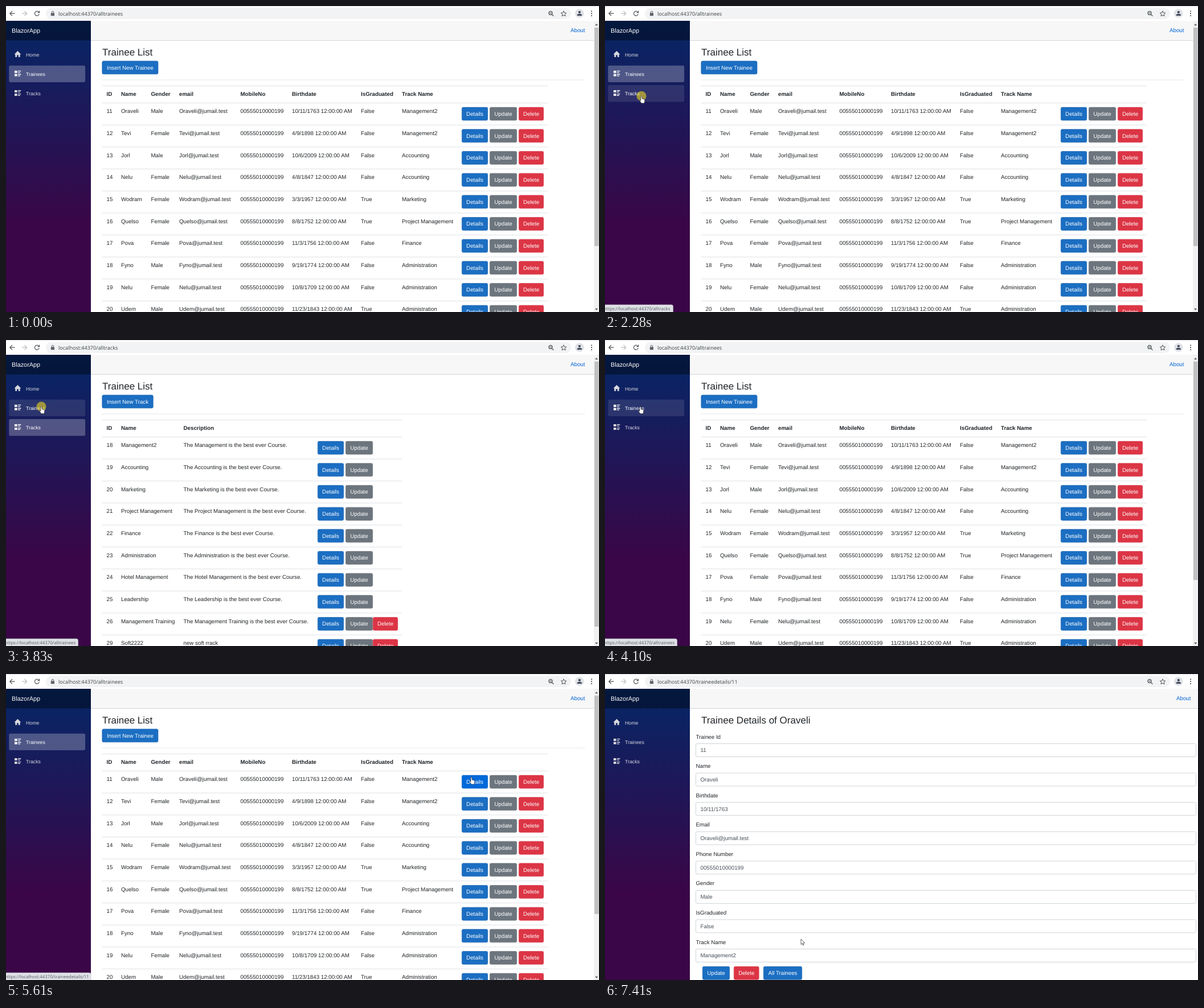
An HTML page that plays this animation: 1041x538 px, repeating every 8 s.

```html
<!DOCTYPE html>
<html lang="en">
<head>
<meta charset="utf-8">
<title>Trainee admin</title>
<style>
  html, body { margin: 0; width: 100%; height: 100%; overflow: hidden; background: #fff; }
  svg { display: block; width: 100%; height: 100%; }
  text { font: 9.75px "Liberation Sans", Arial, sans-serif; fill: #212529; text-rendering: geometricPrecision; white-space: pre; }
  .bold { font-weight: bold; }
  .title { font-size: 17.05px; }
  .ui { font-family: "Open Sans", sans-serif; font-size: 9.05px; fill: #3c4043; }
  .status { font-size: 7.8px; fill: #55585c; }
  .brand { font-size: 10.85px; fill: #fff; }
  .link { fill: #0366d6; }
  .value { fill: #495057; }
  .label { fill: #fff; text-anchor: middle; }
  .blue { fill: #1b6ec2; stroke: #1861ac; }
  .gray { fill: #6c757d; stroke: #6c757d; }
  .red { fill: #dc3545; stroke: #dc3545; }
  .blue.hover { fill: #0069d9; stroke: #0062cc; }
  .gray.hover { fill: #5a6268; stroke: #545b62; }
  .red.hover { fill: #c82333; stroke: #bd2130; }
  .nav text { font-size: 8.77px; }
  .nav text, .nav path { fill: #d9d9de; }
  .nav.active text, .nav.active path, .nav.hover text, .nav.hover path { fill: #fff; }
  .nav rect { fill: #fff; fill-opacity: 0; }
  .nav.active rect { fill-opacity: .25; }
  .nav.hover rect { fill-opacity: .1; }
</style>
</head>
<body>
<svg id="stage" viewBox="0 0 1041 538" preserveAspectRatio="none"></svg>
<script>
const DURATION = 8000;
const stage = document.getElementById('stage');

const text = (x, y, s, cls = '') => `<text x="${x}" y="${y}" class="${cls}">${s}</text>`;
const rect = (x, y, w, h, fill, rx = 0) =>
  `<rect x="${x}" y="${y}" width="${w}" height="${h}" rx="${rx}" fill="${fill}"/>`;
const path = (d, attrs = '') => `<path d="${d}" ${attrs}/>`;
const line = (x1, x2, y, color = '#dee2e6') => path(`M${x1} ${y}H${x2}`, `stroke="${color}"`);
const button = (x, right, y, label, color) =>
  `<rect class="hot ${color}" x="${x + .3}" y="${y + .3}" width="${right - x - .6}" height="23" rx="2.4" stroke-width=".6"/>`
  + text((x + right) / 2, y + 15.1, label, 'label');

// ---- browser frame and sidebar ----
function chrome() {
  const ink = 'fill="none" stroke="#4d5156" stroke-width="1.2"';
  return rect(0, 0, 1041, 26, '#fff') + rect(0, 0, 1041, 1, '#dfe1e5')
    + rect(70, 3.5, 922, 19.5, '#f1f3f4', 9.7)
    + path('M15.5 13.2H7M11 9L6.8 13.2L11 17.4', ink)
    + path('M28 13.2H36.5M32.5 9L36.7 13.2L32.5 17.4', 'fill="none" stroke="#b9bcc0" stroke-width="1.2"')
    + path('M57.6 10.6A4 4 0 1 0 58.3 14.2M58.6 8.6V11.7H55.4', ink)
    + rect(78.8, 12.3, 6.2, 5, '#5f6368', .6)
    + path('M80.2 12.5V11A1.7 1.7 0 0 1 83.6 11V12.5', 'fill="none" stroke="#5f6368"')
    + `<circle cx="956" cy="12.4" r="3" ${ink}/>` + path('M958.2 14.7L961.4 17.8M954.6 12.4H957.4', ink)
    + path('M979 8.8L980.4 11.9L983.8 12.2L981.2 14.5L982 17.8L979 16L976 17.8L976.8 14.5L974.2 12.2L977.6 11.9Z',
        'fill="none" stroke="#4d5156"')
    + '<circle cx="1006.8" cy="13" r="7.8" fill="#dfe1e6"/><circle cx="1006.8" cy="10.8" r="2.1" fill="#3d4657"/>'
    + path('M1002.6 17V16Q1003.2 13.8 1006.8 13.8T1011 16V17Z', 'fill="#3d4657"')
    + [9.3, 13.2, 17.1].map(y => `<circle cx="1028" cy="${y}" r="1.1" fill="#4d5156"/>`).join('')
    + '<text id="url" class="ui" x="92" y="16.7"></text>';
}

function navItem(name, i) {
  const y = 70.5 + i * 34.3;
  const home = 'M20.5 8.6L14.6 14.4H16.3V19.2H19.2V15.8H21.8V19.2H24.7V14.4H26.4Z';
  const list = 'M15 9H19.7V13H15ZM15 14.8H19.7V18.8H15ZM21 9H26.3V10.3H21ZM21 11.7H25V13H21ZM21 14.8H26.3V16.1H21ZM21 17.5H25V18.8H21Z';
  return `<g class="nav"><rect class="hot" x="5.3" y="${y}" width="133.8" height="29.3" rx="2.5"/>`
    + path(i ? list : home, `transform="translate(0 ${y})"`) + text(35, y + 18, name) + '</g>';
}

const sidebar = () => rect(0, 26, 149, 512, 'url(#night)') + rect(0, 26, 149, 34.5, 'rgba(0,0,0,.4)')
  + text(10, 47, 'BlazorApp', 'brand') + ['Home', 'Trainees', 'Tracks'].map(navItem).join('');

// ---- pages ----
const topBar = aboutX => rect(149, 26, 892, 34, '#f7f7f7') + line(149, 1041, 60.5, '#d6d5d5')
  + text(aboutX, 46, 'About', 'link');

const scrollbar = thumbEnd => rect(1032, 26, 9, 512, '#f1f1f1') + rect(1033, 38, 7.5, thumbEnd - 38, '#c1c1c1')
  + path('M1034 34.3L1036.6 31L1039.2 34.3ZM1034 531.8L1036.6 535L1039.2 531.8Z', 'fill="#606060"');

const listHead = (insert, insertRight, right) => text(169, 87.4, 'Trainee List', 'title')
  + button(168.5, insertRight, 96.5, insert, 'blue') + line(168.5, right, 130, '#e6e6e6');

function table(right, columns, headers, rows, buttons) {
  const cells = (values, y, cls) => values.map((v, c) => text(columns[c], y, v, cls)).join('');
  return line(168.5, right, 140.5) + cells(headers, 158.4, 'bold') + line(168.5, right, 170.5)
    + rows.map((row, i) => {
      const y = 170.5 + i * 38.68;
      return cells(row, y + 17.8, '') + buttons(y + 7.3, i) + line(168.5, right, y + 38.68);
    }).join('');
}

const phone = '00555010000199';
const email = name => name + '@jumail.test';

const people = `Oraveli,Male,10/11/1763,False,Management2
Tevi,Female,4/9/1898,False,Management2
Jorl,Male,10/6/2009,False,Accounting
Nelu,Female,4/8/1847,False,Accounting
Wodram,Female,3/3/1957,True,Marketing
Quelso,Female,8/8/1752,True,Project Management
Pova,Female,11/3/1756,False,Finance
Fyno,Male,9/19/1774,False,Administration
Nelu,Female,10/8/1709,False,Administration
Udem,Male,11/23/1843,True,Administration`.split('\n').map((row, i) => {
  const [name, gender, born, graduated, track] = row.split(',');
  return [11 + i, name, gender, email(name), phone, born + ' 12:00:00 AM', graduated, track];
});

const courses = ['Management2', 'Accounting', 'Marketing', 'Project Management', 'Finance',
  'Administration', 'Hotel Management', 'Leadership', 'Management Training']
  .map((name, i) => [18 + i, name, `The ${name.replace('2', '')} is the best ever Course.`]);
courses.push([29, 'Soft2222', 'new soft rrack']);

function trainees() {
  return topBar(991) + listHead('Insert New Trainee', 267.3, 1016) + scrollbar(422)
    + table(951, [176.5, 202, 254.5, 304, 411.5, 502, 623, 695],
      ['ID', 'Name', 'Gender', 'email', 'MobileNo', 'Birthdate', 'IsGraduated', 'Track Name'], people,
      y => button(800, 846, y, 'Details', 'blue') + button(849, 897, y, 'Update', 'gray')
        + button(900, 944, y, 'Delete', 'red'));
}

function tracks() {
  return topBar(991) + listHead('Insert New Track', 258.6, 1016) + scrollbar(504)
    + table(695, [176.5, 202, 311.5], ['ID', 'Name', 'Description'], courses,
      (y, i) => button(547, 593, y, 'Details', 'blue') + button(596, 644, y, 'Update', 'gray')
        + (i > 7 ? button(644, 688, y, 'Delete', 'red') : ''));
}

function details() {
  const [id, name, gender, mail, mobile, , graduated, track] = people[0];
  const fields = [['Trainee Id', id], ['Name', name], ['Birthdate', '10/11/1763'], ['Email', mail],
    ['Phone Number', mobile], ['Gender', gender], ['IsGraduated', graduated], ['Track Name', track]];
  return topBar(1003) + text(169, 87.4, 'Trainee Details of ' + name, 'title')
    + fields.map(([label, value], i) => {
      const y = 122.5 + i * 51.57;
      return text(159.5, y - 8.9, label) + text(167.5, y + 14.9, value, 'value')
        + `<rect x="159.5" y="${y}" width="878" height="23" rx="2.5" fill="none" stroke="#ced4da"/>`;
    }).join('')
    + button(171, 219, 514, 'Update', 'blue') + button(226, 270.5, 514, 'Delete', 'red')
    + button(278, 346, 514, 'All Trainees', 'blue');
}

const pages = {
  trainees: trainees(),
  tracks: tracks(),
  details: details(),
  traineesLoading: topBar(1003) + listHead('Insert New Trainee', 267.3, 1028) + text(169, 149, 'Loading...'),
  tracksLoading: topBar(1003) + listHead('Insert New Track', 258.6, 1028) + text(169, 149, 'Loading...'),
  detailsLoading: topBar(1003) + text(169, 80, 'Loading...')
};

const outline = 'fill="#fff" stroke="#26262c" stroke-width=".7" stroke-linejoin="round"';
const cursors = {
  arrow: path('M0 0V9.6L2.2 7.6L3.8 11L5.2 10.4L3.7 7H6.8Z', outline),
  hand: path('M-1.1 1Q0 -.5 1.1 1V4.6L4.7 5.6Q6 6 5.9 7.6L5 12.6H0L-3 8.6Q-3.2 6.8 -1.1 8Z', outline),
  beam: path('M-2.5 -5H-.6L0 -4.4L.6 -5H2.5M0 -4.4V4.4M-2.5 5H-.6L0 4.4L.6 5H2.5', 'fill="none" stroke="#333" stroke-width=".8"')
};

stage.innerHTML = `<defs><linearGradient id="night" x2="0" y2="1">
    <stop stop-color="#052767"/><stop offset=".7" stop-color="#3a0647"/></linearGradient></defs>`
  + rect(0, 0, 1041, 538, '#fff') + chrome() + sidebar()
  + Object.entries(pages).map(([id, body]) => `<g id="${id}" class="page">${body}</g>`).join('')
  + `<g id="status">${path('', 'id="bubble" fill="#dee1e6" stroke="#c3c6cb" stroke-width=".6"')}
     <text id="statusText" class="ui status" x="-2" y="535"></text></g>`
  + '<g id="pointer"><circle id="click" r="8.5" fill="#e8d21e" fill-opacity=".62"/>'
  + Object.entries(cursors).map(([id, body]) => `<g id="${id}">${body}</g>`).join('') + '</g>';

// ---- timeline ----
const views = [[0, 'trainees'], [2540, 'tracksLoading'], [2740, 'tracks'], [4050, 'traineesLoading'],
  [4100, 'trainees'], [6000, 'detailsLoading'], [6130, 'details']];
const urls = { trainees: 'alltrainees', tracks: 'alltracks', details: 'traineedetails/11' };
const statuses = [[0, ''], [1290, 'alltrainees'], [1910, 'alltracks'], [3240, 'alltrainees'],
  [4720, ''], [5190, 'traineeupdate/11'], [5470, 'traineedetails/11'], [6540, '']];
const bubbleWidth = { alltrainees: 126.5, alltracks: 119.5, 'traineeupdate/11': 149, 'traineedetails/11': 149 };
const clicks = [[2280, 2540], [3830, 4050], [5860, 6000]];
const moves = [[250, 620, 367], [380, 249, 240], [650, 249, 240], [1050, 53, 92], [1320, 48, 110],
  [1460, 48, 105], [1730, 48, 105], [2070, 64, 158.3], [3020, 64, 158.3], [3440, 62, 117],
  [4500, 62, 117], [5250, 868, 188], [5330, 868, 188], [5610, 817, 181.3], [6400, 817, 181.3],
  [6810, 370, 394], [7140, 370, 394], [7410, 344, 466]];

const at = (steps, t) => steps.filter(s => s[0] <= t).pop()[1];

function pointerAt(t) {
  const next = moves.findIndex(m => m[0] > t);
  if (next < 1) return (next ? moves[moves.length - 1] : moves[0]).slice(1);
  const [a, b] = [moves[next - 1], moves[next]];
  const p = (t - a[0]) / (b[0] - a[0]), k = p * p * (3 - 2 * p);
  return [a[1] + (b[1] - a[1]) * k, a[2] + (b[2] - a[2]) * k];
}

const $ = id => document.getElementById(id);
const show = (el, on) => el.style.display = on ? '' : 'none';
const navs = [...stage.querySelectorAll('.nav')];
const pageNodes = [...stage.querySelectorAll('.page')];

function hits(el, x, y) {
  const b = name => +el.getAttribute(name);
  return x >= b('x') && x <= b('x') + b('width') && y >= b('y') && y <= b('y') + b('height');
}

function render(t) {
  const view = at(views, t), section = view.replace('Loading', '');
  const [x, y] = pointerAt(t);
  const visible = t >= moves[0][0];
  let overLink = false;

  const hover = (target, hot) => {
    const on = visible && hits(hot, x, y);
    target.classList.toggle('hover', on);
    overLink = overLink || on;
  };
  pageNodes.forEach(page => show(page, page.id === view));
  $(view).querySelectorAll('.hot').forEach(b => hover(b, b));
  navs.forEach((nav, i) => {
    hover(nav, nav.querySelector('rect'));
    nav.classList.toggle('active', section === ['', 'trainees', 'tracks'][i]);
  });
  $('url').textContent = 'localhost:44370/' + urls[section];

  const status = at(statuses, t);
  show($('status'), status);
  if (status) {
    $('statusText').textContent = 'https://localhost:44370/' + status;
    $('bubble').setAttribute('d', `M-1 525.3H${bubbleWidth[status] - 3}q3 0 3 3V539H-1Z`);
    $('status').setAttribute('opacity', t >= 1290 && t < 1460 ? .35 : 1);
  }

  const waiting = t >= 5610 && t < 6400;
  const kind = overLink || waiting ? 'hand' : section === 'details' && y > 380 && y < 404 ? 'beam' : 'arrow';
  show($('pointer'), visible);
  Object.keys(cursors).forEach(id => show($(id), id === kind));
  show($('click'), clicks.some(([from, to]) => t >= from && t < to));
  $('pointer').setAttribute('transform', `translate(${x} ${y})`);
}

const start = performance.now();
function tick() {
  render((performance.now() - start) % DURATION);
  requestAnimationFrame(tick);
}
tick();
</script>
</body>
</html>
```
